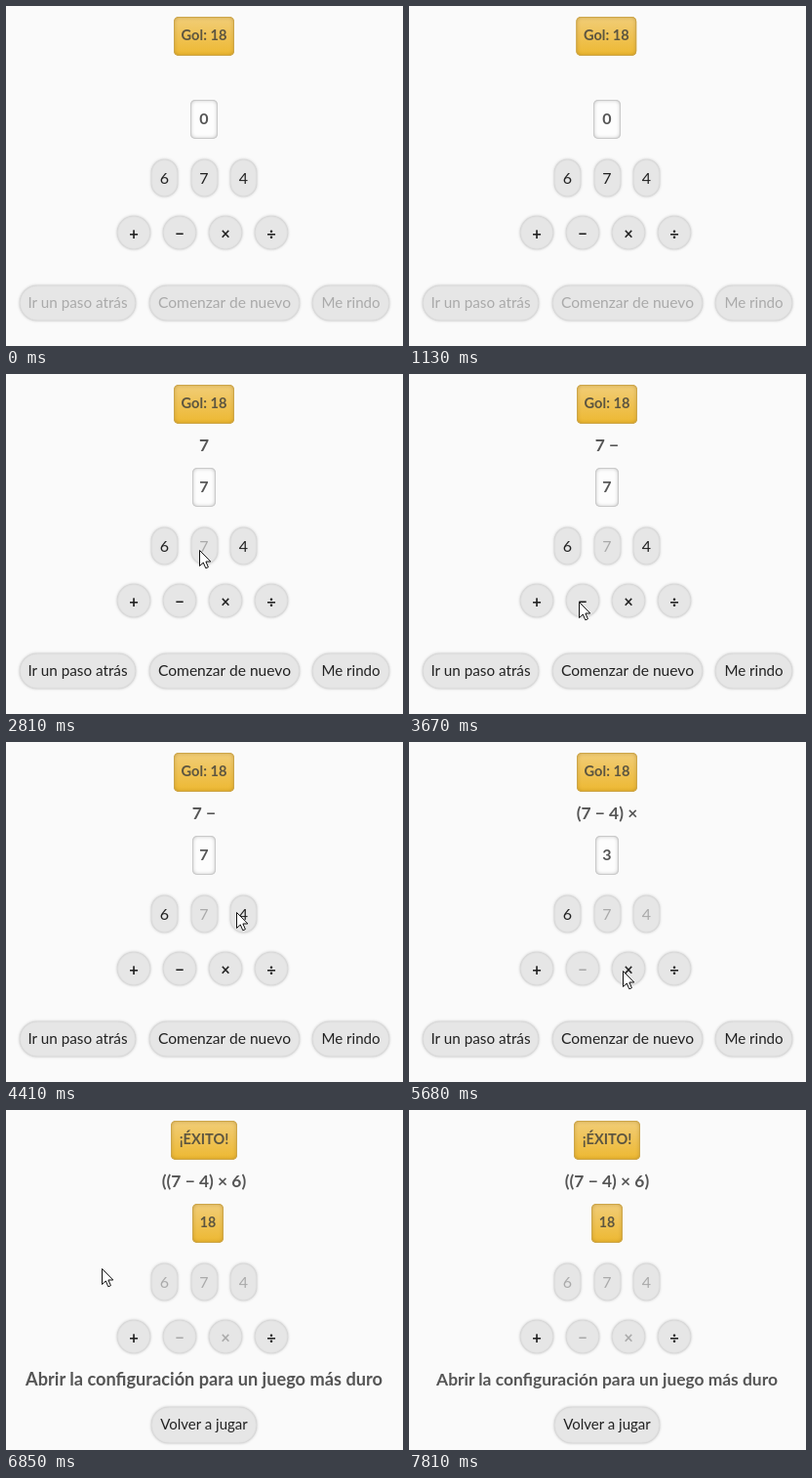
An HTML page that plays this animation: 407x348 px, repeating every 8730 ms.

```html
<!DOCTYPE html>
<html lang="es">
<head>
<meta charset="utf-8">
<title>Juego de números</title>
<style>
  html, body { margin: 0; width: 100%; height: 100%; overflow: hidden; background: #fafafa; }
  #stage { position: absolute; left: 0; top: 0; width: 407px; height: 348px; overflow: hidden;
    font-family: Lato, "Open Sans", sans-serif; color: #222; }
  #stage div { position: absolute; box-sizing: border-box; text-align: center; white-space: nowrap; }
  .pill { background: #e6e6e6; border-radius: 18px; box-shadow: 0 0 3px rgba(0,0,0,.28), inset 0 0 2px rgba(0,0,0,.12); }
  .pill.off { color: #aaa; }
  .bold, .box { font-weight: 700; color: #555; }
  .box { border-radius: 5px; background: #fdfdfd; box-shadow: inset 0 0 0 1px #cacaca, inset 0 0 4px rgba(0,0,0,.32); }
  .gold { background: linear-gradient(#f1cd78, #edb831); color: #5c5540;
    box-shadow: inset 0 0 0 1px #cda64a, inset 0 0 4px rgba(120,80,0,.45); }
  .op { font-weight: 700; }
  svg { position: absolute; left: 0; top: 0; overflow: visible; }
</style>
</head>
<body>
<div id="stage"></div>
<script>
const LOOP = 8730;
const stage = document.getElementById('stage');

// dy shifts the text inside its box
function add(cx, cy, w, h, cls, size, text = '', dy = 0) {
  const e = document.createElement('div');
  e.className = cls;
  e.textContent = text;
  e.style.cssText = `left:${cx - w / 2}px;top:${cy - h / 2}px;width:${w}px;height:${h}px;` +
    `line-height:${h + 2 * dy}px;font-size:${size}px`;
  stage.append(e);
  return e;
}

const goal = add(203, 31, 62, 40, 'box gold', 14.6, '', -1);
const formula = add(203, 73, 160, 24, 'bold', 17.4);
const display = add(203, 116, 28, 40, 'box', 16, '', -1);
const numbers = ['6', '7', '4'].map((s, i) => add(162.5 + 40.5 * i, 176, 27, 38, 'pill', 16, s));
const ops = ['+', '−', '×', '÷'].map((s, i) => add(131 + 47 * i, 232, 34, 34, 'pill op', 16.5, s, 1));
const controls = [
  add(73.5, 304, 119, 36, 'pill', 15.25, 'Ir un paso atrás', -1),
  add(224, 304, 154, 36, 'pill', 15.6, 'Comenzar de nuevo', -1),
  add(353.5, 304, 79, 36, 'pill', 15.1, 'Me rindo', -1)
];
const message = add(203, 275.5, 380, 26, 'bold', 17.4, 'Abrir la configuración para un juego más duro');
const again = add(203, 322, 108, 37, 'pill', 15, 'Volver a jugar', -1);

stage.insertAdjacentHTML('beforeend',
  '<svg width="14" height="20"><path d="M.5 .5V16.5L4.3 13L6.8 18.8L9.4 17.7L6.9 12H11.8Z" fill="#fff" stroke="#111"/></svg>');
const cursor = stage.lastElementChild;

// start, formula, display, used numbers, used operators
const states = [
  [0, '', '0', '', ''],
  [2670, '7', '7', '7', ''],
  [3670, '7 −', '7', '7', ''],
  [4550, '(7 − 4)', '3', '74', '−'],
  [5480, '(7 − 4) ×', '3', '74', '−'],
  [6370, '((7 − 4) × 6)', '18', '674', '−×']
];

// start, end, number of steps
const bursts = [
  [1000, 1820, 13], [1890, 2400, 9], [2670, 3540, 13], [3670, 4480, 12],
  [4550, 5150, 9], [5480, 6300, 12], [6370, 7190, 13], [7260, 7810, 9]
];

// time, x, y, linear approach
const path = [
  [1950, 289, 60], [2400, 198, 180], [2940, 198, 180], [3540, 174, 233], [3670, 174, 233],
  [4406, 236, 174], [4480, 238, 176], [4550, 238, 176], [5150, 219, 235], [5480, 219, 234],
  [5710, 219, 234], [6300, 161, 180], [6440, 161, 180], [6850, 98, 162, 1], [7125, 9, 150, 1]
];

function snap(t) {
  const b = bursts.filter(b => t >= b[0]).pop();
  if (!b) return t;
  const n = b[2] - 1, step = (b[1] - b[0]) / n;
  return b[0] + step * Math.min(n, Math.floor((t - b[0] + 8) / step));
}

function shake(t, start) {
  const u = (t - start) / 1400;
  return u > 0 && u < 1 ? -12.8 * (1 - u) ** 2.7 * Math.sin(10 * Math.PI * u) : 0;
}

function moveCursor(t) {
  const shown = t >= path[0][0] && t < 7185;
  cursor.style.display = shown ? '' : 'none';
  if (!shown) return;
  const i = path.findIndex(p => p[0] > t);
  const b = i < 0 ? path[path.length - 1] : path[i];
  const a = i < 0 ? b : path[i - 1];
  let u = a === b ? 0 : (t - a[0]) / (b[0] - a[0]);
  if (!b[3]) u = u * u * (3 - 2 * u);
  const at = k => Math.round(a[k] + (b[k] - a[k]) * u);
  cursor.style.transform = `translate(${at(1)}px,${at(2)}px)`;
}

function setWidth(e, w) {
  e.style.width = w + 'px';
  e.style.left = 203 - w / 2 + 'px';
}

function draw(time) {
  const t = snap(time);
  const [, expr, value, usedNumbers, usedOps] = states.filter(s => time >= s[0]).pop();
  const won = time >= 6370;
  const show = (e, on) => e.style.display = on ? '' : 'none';

  goal.textContent = won ? '¡ÉXITO!' : 'Gol: 18';
  setWidth(goal, won ? 68 : 62);
  goal.style.transform = `translateX(${shake(t, 1000)}px)`;

  formula.textContent = expr;
  display.textContent = value;
  setWidth(display, { 0: 28, 18: 32 }[value] || 24);
  display.style.fontSize = (won ? 14.2 : 16) + 'px';
  display.classList.toggle('gold', won);
  display.style.transform = `translateX(${shake(t, 6370)}px)`;

  numbers.forEach(e => e.classList.toggle('off', usedNumbers.includes(e.textContent)));
  ops.forEach(e => e.classList.toggle('off', usedOps.includes(e.textContent)));
  controls.forEach(e => {
    e.classList.toggle('off', time < 2670);
    show(e, !won);
  });
  show(message, won);
  show(again, won);
  message.style.transform = `scale(${1 + 0.106 * Math.max(0, 1 - (t - 6370) / 846)})`;
  moveCursor(t);
}

const begin = performance.now();
function tick() {
  draw((performance.now() - begin) % LOOP);
  requestAnimationFrame(tick);
}
tick();
</script>
</body>
</html>
```
